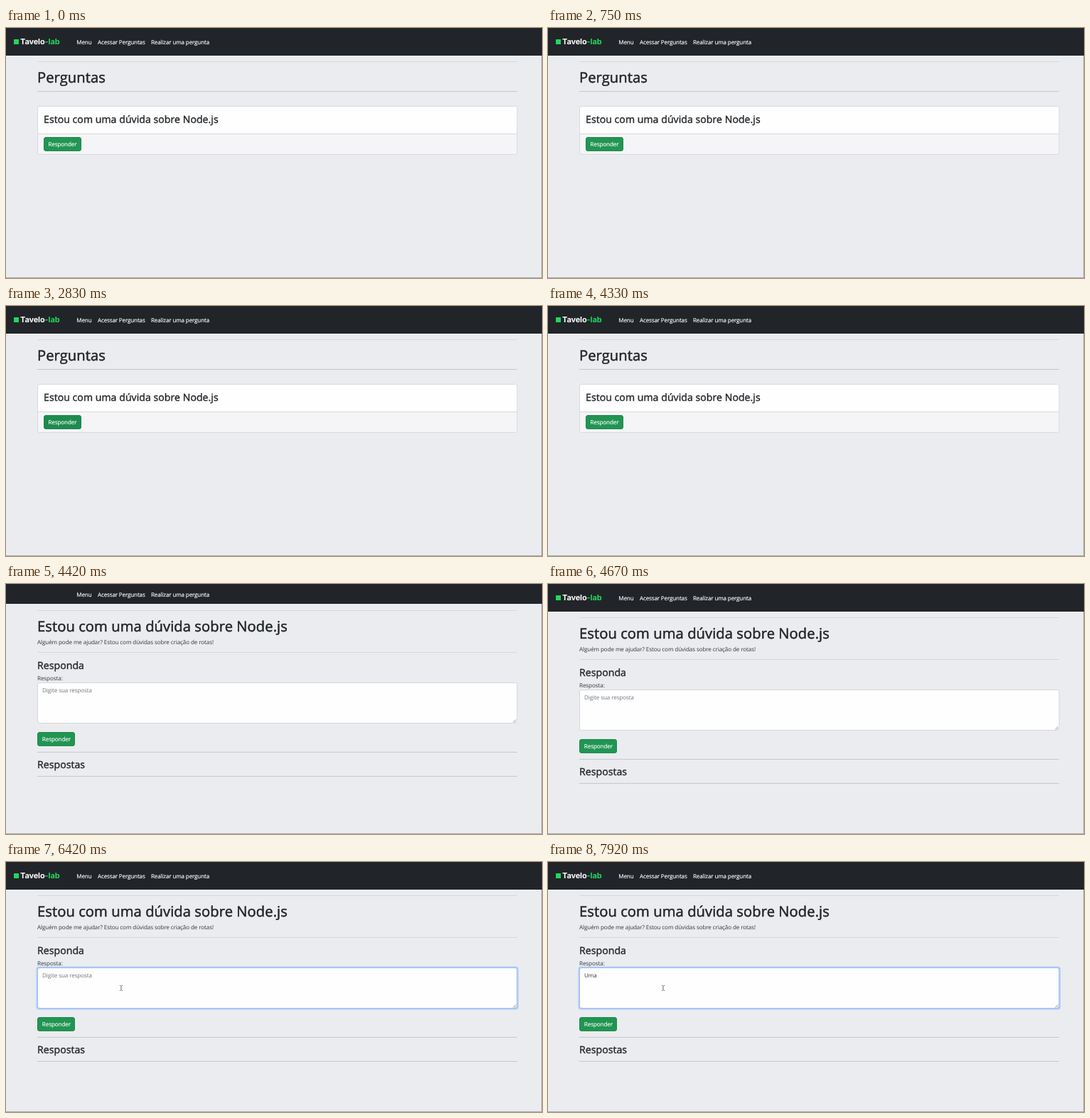
An HTML page that plays this animation: 754x353 px, repeating every 8 s.

```html
<!DOCTYPE html>
<html lang="pt-BR">
<head>
<meta charset="utf-8">
<title>Perguntas</title>
<style>
  html, body { margin: 0; height: 100%; overflow: hidden; background: #ebecef; }
  svg { display: block; width: 100vw; height: 100vh; }
  text {
    font: 8.1px "Open Sans", "Noto Sans", sans-serif;
    letter-spacing: -.013em;
    text-rendering: geometricPrecision;
    fill: #33373c;
    white-space: pre;
  }
  /* A thin stroke gives the medium weight */
  .h1, .h3 { letter-spacing: .003em; fill: #212529; stroke: #212529; }
  .h1 { font-size: 20.2px; stroke-width: .5px; }
  .h3 { font-size: 14.1px; stroke-width: .38px; }
  .links text, .label { fill: #fff; stroke: #fff; stroke-width: .14px; }
  .links text { letter-spacing: -.02em; }
  .brand { font: 700 11px Inter, sans-serif; fill: #fff; }
  .tail, .mark { fill: #22d85c; }
  .btn { fill: #219553; stroke: #1a8a4b; }
  .hint { fill: #6f767d; }
  .rule { stroke: #c5c7ca; }
  .soft { stroke: #d6d8db; }

  /* Hard changes: 8 s loop, stepped */
  .first, .second, .bar, .links, .shift, .logo, .hint, .key, .caret, .pointer {
    animation: 8s step-end infinite;
  }
  .first { animation-name: first; }
  .second { animation-name: second; }
  .bar { animation-name: bar; }
  .links { animation-name: links; }
  .shift { animation-name: shift; }
  .logo { animation-name: logo; }
  .hint { animation-name: hint; }
  .caret { animation-name: caret; }
  .pointer { animation-name: pointer; }
  .u { animation-name: typeU; }
  .m { animation-name: typeM; }
  .a { animation-name: typeA; }
  .hover { animation: hover 8s linear infinite; }
  .ring { animation: ring 8s linear infinite; }

  @keyframes first { 0% { opacity: 1 } 55.2%, 100% { opacity: 0 } }
  @keyframes second { 0% { opacity: 0 } 55.2%, 100% { opacity: 1 } }
  /* The bar is short until the logo has loaded */
  @keyframes bar {
    0% { transform: none } 55.2% { transform: translateY(-11px) }
    58.375%, 100% { transform: none }
  }
  @keyframes links {
    0% { transform: none } 55.2% { transform: translateY(-5px) }
    58.375%, 100% { transform: none }
  }
  @keyframes shift {
    0% { transform: translateY(-10px) } 58.375%, 100% { transform: none }
  }
  @keyframes logo { 0% { opacity: 1 } 55.2% { opacity: 0 } 58.375%, 100% { opacity: 1 } }
  @keyframes hover {
    0%, 33.3% { fill: #219553 } 35.3%, 37.5% { fill: #1e8b4e }
    41.6%, 100% { fill: #219553 }
  }
  @keyframes ring { 0%, 69% { opacity: 0 } 71%, 100% { opacity: 1 } }
  @keyframes pointer { 0% { opacity: 0 } 69.8%, 100% { opacity: 1 } }
  @keyframes hint { 0% { opacity: 1 } 88.5%, 100% { opacity: 0 } }
  @keyframes typeU { 0% { opacity: 0 } 88.5%, 100% { opacity: 1 } }
  @keyframes typeM { 0% { opacity: 0 } 91.625%, 100% { opacity: 1 } }
  @keyframes typeA { 0% { opacity: 0 } 93.75%, 100% { opacity: 1 } }
  @keyframes caret {
    0% { opacity: 0; transform: none }
    70.875% { opacity: 1; transform: none }
    77.125% { opacity: 0; transform: none }
    84.375% { opacity: 1; transform: none }
    88.5% { opacity: 1; transform: translateX(6px) }
    91.625% { opacity: 1; transform: translateX(13.3px) }
    93.75% { opacity: 1; transform: translateX(17.6px) }
    95.875% { opacity: 1; transform: translateX(19.6px) }
    98.9%, 100% { opacity: 0; transform: translateX(19.6px) }
  }
</style>
</head>
<body>
<svg viewBox="0 0 754 353" preserveAspectRatio="none">
  <rect width="754" height="353" fill="#ebecef"/>
  <path d="M753.5 0V353M0 352.5H754" stroke="#a8a9ac"/>

  <g class="first">
    <path class="soft" d="M44 47.5H719"/>
    <text class="h1" x="44" y="77">Perguntas</text>
    <path class="rule" d="M44 89.5H719"/>
    <rect x="44.5" y="110.5" width="674.5" height="68" rx="2.5" fill="#f5f5f7"/>
    <path d="M45 149.5V113a2 2 0 0 1 2-2H717a2 2 0 0 1 2 2V149.5Z" fill="#fefefe"/>
    <path d="M45 149.5H719" stroke="#d7d8db"/>
    <rect x="44.5" y="110.5" width="674.5" height="68" rx="2.5" fill="none" stroke="#d9dade"/>
    <text class="h3" x="53" y="134">Estou com uma dúvida sobre Node.js</text>
    <rect class="btn hover" x="53.5" y="154.5" width="52" height="19" rx="2.5"/>
    <text class="label" x="59.3" y="167.3">Responder</text>
  </g>

  <g class="second">
    <g class="shift">
      <path class="soft" d="M44 47.5H719"/>
      <text class="h1" x="44" y="77">Estou com uma dúvida sobre Node.js</text>
      <text x="44" y="95">Alguém pode me ajudar? Estou com dúvidas sobre criação de rotas!</text>
      <path class="soft" d="M44 106.5H719"/>
      <text class="h3" x="44" y="129.5">Responda</text>
      <text x="44" y="146">Resposta:</text>

      <rect class="ring" x="42.5" y="147.5" width="678.5" height="61" rx="4" fill="#b4cbf4"/>
      <rect x="44.5" y="149.5" width="674.5" height="57" rx="2.5" fill="#fefefe" stroke="#d4d7dc"/>
      <rect class="ring" x="44.5" y="149.5" width="674.5" height="57" rx="2.5" fill="none" stroke="#9cbff8"/>
      <path d="M713.5 205.5l4-4M716 205.5l1.5-1.5" stroke="#777" stroke-width=".8"/>
      <text class="hint" x="51" y="162.5">Digite sua resposta</text>
      <text x="51" y="162.5"><tspan class="key u">U</tspan><tspan class="key m">m</tspan><tspan class="key a">a</tspan></text>
      <path class="caret" d="M51.5 154V165" stroke="#33373c" stroke-width=".8"/>

      <rect class="btn" x="44.5" y="219.5" width="52" height="19" rx="2.5"/>
      <text class="label" x="50.8" y="232.2">Responder</text>
      <path class="rule" d="M44 247.5H719"/>
      <text class="h3" x="44" y="270">Respostas</text>
      <path class="rule" d="M44 281.5H719"/>
    </g>
    <path class="pointer" d="M160 174.5H161.3M162.7 174.5H164M162 175V181M160 181.5H161.3M162.7 181.5H164" fill="none" stroke="#555" stroke-width=".9"/>
  </g>

  <g class="nav">
    <rect class="bar" y="-11" width="754" height="50" fill="#212529"/>
    <g class="logo">
      <rect class="mark" x="11" y="16" width="7" height="7"/>
      <text class="brand" x="20" y="23">Tavelo<tspan class="tail">-lab</tspan></text>
    </g>
    <g class="links">
      <text x="99.3" y="22.5">Menu</text>
      <text x="129" y="22.5">Acessar Perguntas</text>
      <text x="204" y="22.5">Realizar uma pergunta</text>
    </g>
  </g>
</svg>
</body>
</html>
```
